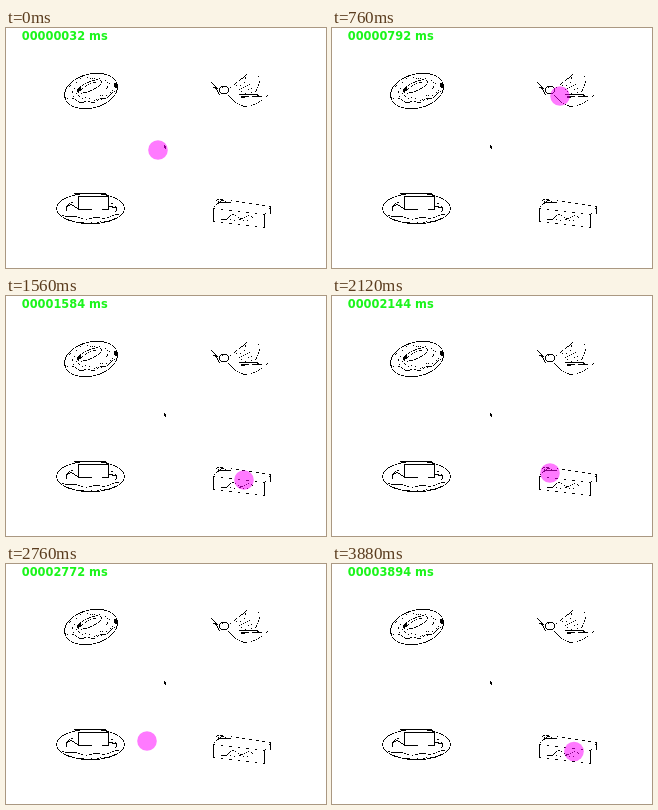
An HTML page with a canvas that plays this animation: 320 by 240 pixels, repeating every 3.92 s.

```html
<!DOCTYPE html>
<html lang="en">
<head>
<meta charset="utf-8">
<title>Gaze replay</title>
<style>
  html, body { margin: 0; width: 100%; height: 100%; overflow: hidden; background: #fff; }
  canvas { display: block; width: 320px; height: 240px; }
</style>
</head>
<body>
<canvas id="stage" width="320" height="240"></canvas>
<script>
const ctx = document.getElementById('stage').getContext('2d');
const LOOP = 3920, STEP = 40, JUMP = 80;

const fixations = [
  { at: 0, x: 152, y: 122 },
  { at: 160, x: 81, y: 73 },
  { at: 560, x: 150, y: 117 },
  { at: 680, x: 228, y: 68 },
  { at: 920, x: 218, y: 65 },
  { at: 1240, x: 238, y: 184 },
  { at: 1640, x: 218, y: 177 },
  { at: 2280, x: 88, y: 186 },
  { at: 2680, x: 141, y: 177 },
  { at: 2760, x: 232, y: 186 },
  { at: 3400, x: 242, y: 187.5 }
];

const drawing = document.createElement('canvas');
drawing.width = 320;
drawing.height = 240;
const pen = drawing.getContext('2d');
pen.translate(0.5, 0.5);

let seed = 7;
const random = () => (seed = seed * 16807 % 2147483647) / 2147483647;
const mix = (a, b, k) => a + (b - a) * k;

function trace(d, width = 0.7) {
  pen.lineWidth = width;
  pen.stroke(new Path2D(d));
}

function oval(x, y, rx, ry, turn = 0, filled = false) {
  pen.lineWidth = 0.75;
  pen.beginPath();
  pen.ellipse(x, y, rx, ry, turn, 0, Math.PI * 2);
  filled ? pen.fill() : pen.stroke();
}

// A line that sags in the middle and ripples along its length.
function wave(x0, y0, x1, y1, sag, ripple, cycles, width = 0.7) {
  pen.lineWidth = width;
  pen.beginPath();
  for (let k = 0; k <= 1; k += 0.02) {
    const bend = sag * Math.sin(Math.PI * k) + ripple * Math.sin(2 * Math.PI * cycles * k);
    pen.lineTo(mix(x0, x1, k), mix(y0, y1, k) + bend);
  }
  pen.stroke();
}

function drawDonut() {
  oval(84.5, 62.5, 27, 17, -0.25);
  oval(83, 58, 13, 4.5, -0.42);
  wave(73, 62, 93, 55, -3, 0.5, 1);
  oval(72.5, 61, 2.4, 1.8, -0.5, true);
  oval(109, 57, 1.3, 3, -0.3, true);
  wave(58, 68, 110, 63, 8, 1.1, 4);
  for (let i = 0; i < 38; i++) {
    const reach = 0.6 + random() * 0.3;
    const x = Math.round(84 + Math.cos(i * 2.4) * 26 * reach);
    const y = Math.round(60 + Math.sin(i * 2.4) * 14 * reach);
    pen.fillRect(x - 0.5, y - 0.5, 1, 1);
  }
}

function drawBird() {
  oval(217.5, 61.5, 5, 4);
  oval(216, 59, 0.8, 0.8, 0, true);
  trace('M205 54 L209 58 L211 63 L213 66 M207 59 L211 60', 1);
  trace('M221 66 Q229 76 238 78 Q250 78 262 66', 0.65);
  trace('M223 60 L240 46 L238 53 M252 47 L253 54 L249 64', 0.6);
  for (let i = 0; i < 6; i++) {
    trace(`M${229 + i} ${58 + i * 2} L${238 + i * 3} ${48 + i * 3.8}`, 0.5);
  }
  trace('M232 66 L252 66 M234 69 L256 68', 0.55);
}

function drawPlate() {
  oval(84, 180, 34, 15.2);
  trace('M85 181 H72 V168 H102 V181 H96 M68 165 H99 L102 168', 0.9);
  trace('M68 173 Q58 176 60 183 M103 174 Q113 177 109 184', 0.7);
  wave(54, 186, 114, 186, 4, 0.8, 3);
  wave(58, 190, 112, 190, 4, 0.6, 4, 0.5);
  trace('M60 178 L65 176 L71 180 M103 178 L109 179', 0.9);
}

function drawCase() {
  for (const top of [180, 193]) trace(`M207 ${top} l51 6`, 0.52);
  trace('M224 172 L264 178 V186 M264 179 L258 186 V199', 0.55);
  trace('M207 180 V193 M207 179 L213 172', 0.6);
  trace('M209 174 Q211 169 215 171 T220 173 M210 176 L217 171 M213 174 H225', 0.75);
  wave(214, 190, 247, 190, -2, 2, 2, 0.65);
  wave(214, 191, 247, 192, 0, 0.5, 3, 0.55);
}

// Keeps only fully black pixels, so thin strokes look scanned.
function harden() {
  const picture = pen.getImageData(0, 0, 320, 240);
  for (let i = 3; i < picture.data.length; i += 4) {
    picture.data[i] = picture.data[i] > 108 ? 255 : 0;
  }
  pen.putImageData(picture, 0, 0);
}

drawDonut();
drawBird();
drawPlate();
drawCase();
trace('M158 117 L159 120', 1.4);
harden();

function gazeAt(time) {
  const current = fixations.findLastIndex(f => f.at <= time);
  const to = fixations[current];
  const from = fixations[Math.max(0, current - 1)];
  const k = Math.min(1, (time - to.at) / JUMP);
  return [mix(from.x, to.x, k), mix(from.y, to.y, k)];
}

function clockText(index) {
  const sample = Math.round(1.3 + index * 1.2);
  return String(sample * 33 - sample % 2).padStart(8, '0') + ' ms';
}

function render(now) {
  const index = Math.floor(now % LOOP / STEP);
  const [x, y] = gazeAt(index * STEP);
  ctx.fillStyle = '#fff';
  ctx.fillRect(0, 0, 320, 240);
  ctx.drawImage(drawing, 0, 0);
  ctx.fillStyle = 'rgba(255, 0, 255, 0.52)';
  ctx.beginPath();
  ctx.arc(x, y, 9.8, 0, Math.PI * 2);
  ctx.fill();
  ctx.fillStyle = '#1bf51b';
  ctx.font = 'bold 11.4px "DejaVu Sans", sans-serif';
  ctx.fillText(clockText(index), 15.7, 12);
}

const start = performance.now();
function tick() {
  render(performance.now() - start);
  requestAnimationFrame(tick);
}
tick();
</script>
</body>
</html>
```
